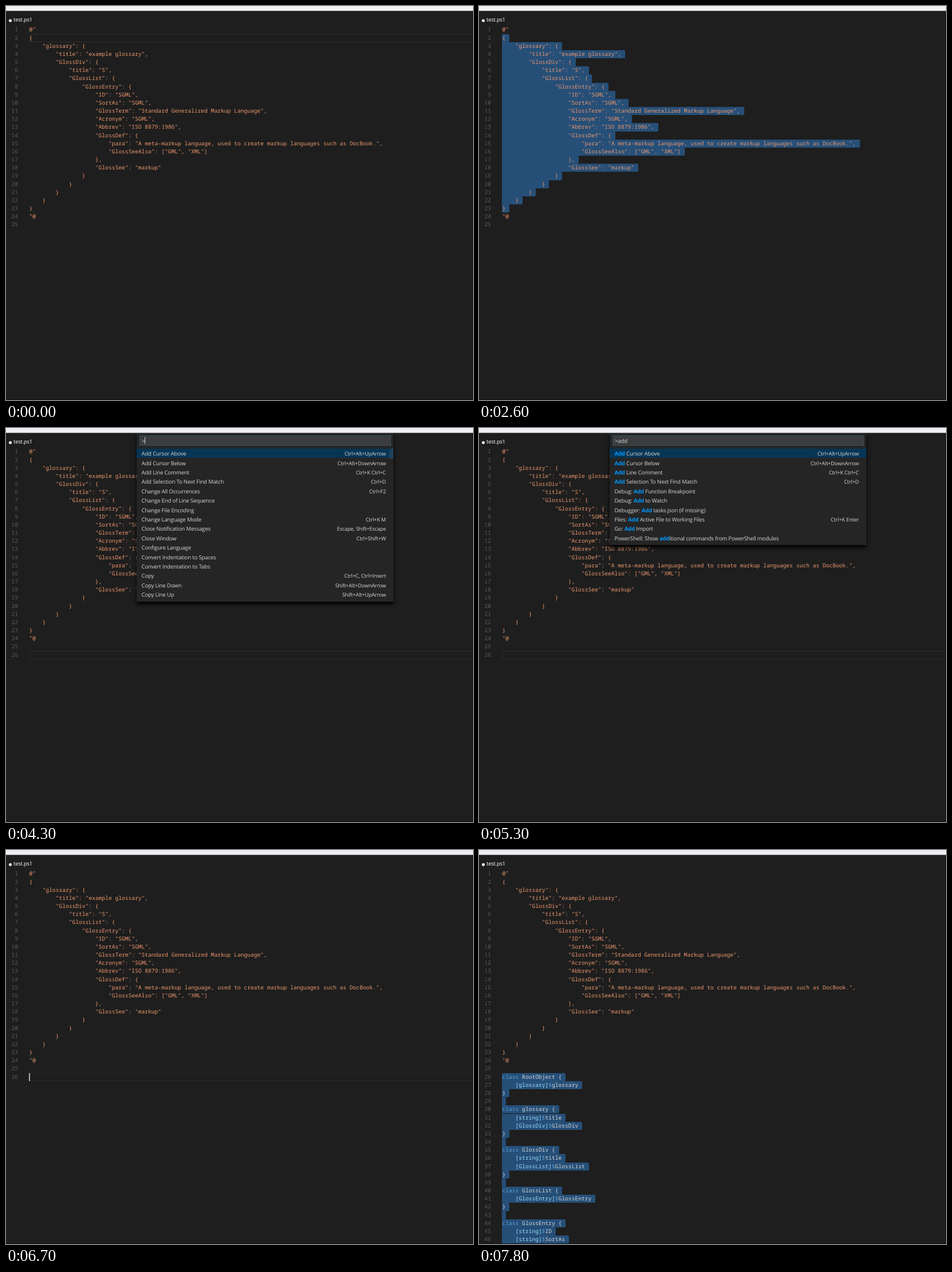
These frames come from a looping animation (815 by 687 pixels, 8 s). An HTML page:

```html
<!DOCTYPE html>
<html lang="en">
<head>
<meta charset="utf-8">
<title>Editor session</title>
<style>
  html, body { margin: 0; width: 100%; height: 100%; overflow: hidden; background: #1e1e1e; }
  #stage { position: relative; width: 815px; height: 687px; overflow: hidden; background: #1e1e1e;
    text-rendering: geometricPrecision; }
  #stage div, #stage i { position: absolute; white-space: pre; box-sizing: border-box; }
  .ui { font: 9.6px "Open Sans", "Noto Sans", sans-serif; letter-spacing: -.17px; color: #d4d4d4; }
  .code { font: 9.625px "Noto Sans Mono", "DejaVu Sans Mono", monospace; }
  #bar { left: 0; top: 0; width: 815px; height: 9px; background: #eeeef2; border-bottom: 1px solid #868689; }
  #edge { inset: 8px 0 0 0; border: solid #111; border-width: 0 1px 1px 0; }
  #dot { left: 5px; top: 23px; width: 5px; height: 5px; border-radius: 50%; background: #fff; }
  #tab { left: 13px; top: 17px; line-height: 14px; color: #fff; font-size: 9.4px; }
  .row { left: 40.5px; height: 14.17px; line-height: 14.17px; color: #ea966c; }
  .num { left: 0; width: 21px; height: 14.17px; line-height: 14.17px; text-align: right; color: #5a5a5a; }
  .sel { left: 40px; height: 14.17px; background: #264f78; border-radius: 0 2px 2px 0; }
  #here { left: 41px; width: 780px; height: 14px; border: 1px solid #2c2c2c; }
  #caret { width: 2px; height: 14px; background: #aeafad; }
  .plain { color: #d4d4d4; } .key { color: #569cd6; } .type { color: #9cdcfe; }
  #palette { left: 228px; top: 8px; width: 448px; background: #252526; box-shadow: 0 4px 6px #000; }
  #input { left: 5px; top: 5px; width: 439px; height: 18px; padding-left: 3px; line-height: 17px;
    background: #3c3c3c; border: 1px solid #31505f; }
  #input i { width: 1px; height: 12px; top: 2px; background: #d4d4d4; }
  #input .hint { color: #a0a0a0; }
  .item { left: 0; width: 448px; height: 16.4px; padding-left: 8.5px; line-height: 17.6px; }
  .item.on { background: #073655; }
  .item b { color: #0097fb; font-weight: 700; }
  .item div { right: 13px; top: 0; font-size: 9.2px; }
  #thumb { right: 0; top: 28.1px; width: 7px; height: 18px; background: rgba(121, 121, 121, .2); }
</style>
</head>
<body>
<div id="stage">
  <div id="marks"></div>
  <div id="here"></div>
  <div id="text" class="code"></div>
  <div id="caret"></div>
  <div id="dot"></div>
  <div id="tab" class="ui">test.ps1</div>
  <div id="edge"></div>
  <div id="palette" class="ui"></div>
  <div id="bar"></div>
</div>
<script>
const LOOP = 8000, TOP = 34.4, PITCH = 14.17, CHAR = 5.775;
const LIST_TOP = 28.1, ITEM = 16.4, MAX_ITEMS = 16;
const $ = id => document.getElementById(id);
const lineTop = n => TOP + (n - 1) * PITCH;

const json = `@"
{
    "glossary": {
        "title": "example glossary",
        "GlossDiv": {
            "title": "S",
            "GlossList": {
                "GlossEntry": {
                    "ID": "SGML",
                    "SortAs": "SGML",
                    "GlossTerm": "Standard Generalized Markup Language",
                    "Acronym": "SGML",
                    "Abbrev": "ISO 8879:1986",
                    "GlossDef": {
                        "para": "A meta-markup language, used to create markup languages such as DocBook.",
                        "GlossSeeAlso": ["GML", "XML"]
                    },
                    "GlossSee": "markup"
                }
            }
        }
    }
}
"@
`.split("\n");

const classes = `class RootObject {
    [glossary]$glossary
}

class glossary {
    [string]$title
    [GlossDiv]$GlossDiv
}

class GlossDiv {
    [string]$title
    [GlossList]$GlossList
}

class GlossList {
    [GlossEntry]$GlossEntry
}

class GlossEntry {
    [string]$ID
    [string]$SortAs
    [string]$GlossTerm`.split("\n");

// label | shortcut, in alphabetical order
const commands = `Add Cursor Above|Ctrl+Alt+UpArrow
Add Cursor Below|Ctrl+Alt+DownArrow
Add Line Comment|Ctrl+K Ctrl+C
Add Selection To Next Find Match|Ctrl+D
Change All Occurrences|Ctrl+F2
Change End of Line Sequence
Change File Encoding
Change Language Mode|Ctrl+K M
Close Notification Messages|Escape, Shift+Escape
Close Window|Ctrl+Shift+W
Configure Language
Convert Indentation to Spaces
Convert Indentation to Tabs
Copy|Ctrl+C, Ctrl+Insert
Copy Line Down|Shift+Alt+DownArrow
Copy Line Up|Shift+Alt+UpArrow
Debug: Add Function Breakpoint
Debug: Add to Watch
Debugger: Add tasks.json (if missing)
Files: Add Active File to Working Files|Ctrl+K Enter
Go: Add Import
PowerShell: Show additional commands from PowerShell modules
Reload Keybindings
Reload Project
Reload Window`.split("\n").map(s => s.split("|"));

const before = { rows: json, here: 2 };
const after = { rows: [...json, ""], here: 26 };
const ask = (query, more) => ({ ...after, query, caretOn: true, ...more });
const pick = { ...after, hint: "Select a command", items: [["Apply my edit!"]] };

const scenes = [
  [0, before],
  [500, { ...before, caret: [1, 2] }],
  [900, before],
  [1100, { ...before, caret: [1, 0] }],
  [1400, { ...before, caret: [2, 0] }],
  [1600, { rows: json, sel: [2, 24], caret: [25, 0] }],
  [2100, { rows: json, sel: [2, 23], caret: [24, 0] }],
  [2600, { rows: json, sel: [2, 23] }],
  [2800, { rows: json, here: 25, caret: [25, 0] }],
  [3100, { ...after, caret: [26, 0] }],
  [3600, after],
  [4000, { ...after, caret: [26, 0] }],
  [4300, ask("")],
  [4400, ask("a")],
  [4700, ask("ad")],
  [4900, ask("add")],
  [5300, ask("add", { caretOn: false })],
  [5800, ask("addi")],
  [6200, ask("addi", { focus: 2 })],
  [6700, { ...after, caret: [26, 0] }],
  [6800, { ...pick, caretOn: true }],
  [7300, pick],
  [7700, { ...after, caret: [26, 0] }],
  [7800, { rows: [...json, ...classes], sel: [26, 47] }]
];

// Spreads the query over word starts; returns [index, length] pairs or null.
function byWords(label, query, from = 0) {
  for (const { index } of label.matchAll(/\b\w/g)) {
    if (index < from) continue;
    for (let k = query.length; k; k--) {
      if (!label.startsWith(query.slice(0, k), index)) continue;
      const rest = k === query.length ? [] : byWords(label, query.slice(k), index + k);
      if (rest) return [[index, k], ...rest];
    }
  }
  return null;
}

function findMatch(label, query) {
  if (!query) return [];
  const low = label.toLowerCase(), at = low.indexOf(query);
  return byWords(low, query) || (at < 0 ? null : [[at, query.length]]);
}

function emphasise(label, spans) {
  let html = "", pos = 0;
  for (const [at, len] of spans) {
    html += label.slice(pos, at) + "<b>" + label.slice(at, at + len) + "</b>";
    pos = at + len;
  }
  return html + label.slice(pos);
}

const span = (cls, s) => `<span class="${cls}">${s}</span>`;

function paint(row, i) {
  if (i < json.length) return row;
  const field = row.match(/^( *)(\[\w+\])\$(\w+)$/);
  if (field) return field[1] + span("type", field[2]) + span("key", "$") + span("plain", field[3]);
  return span("plain", row.replace(/^class/, span("key", "class")));
}

function drawEditor({ rows, sel, here, caret }) {
  $("text").innerHTML = rows.map((row, i) => {
    const top = `style="top:${lineTop(i + 1)}px"`;
    return `<div class="num" ${top}>${i + 1}</div><div class="row" ${top}>${paint(row, i)}</div>`;
  }).join("");

  let marks = "";
  if (sel) for (let n = sel[0]; n <= sel[1]; n++)
    marks += `<div class="sel" style="top:${lineTop(n)}px;width:${rows[n - 1].length * CHAR + 7.3}px"></div>`;
  $("marks").innerHTML = marks;

  $("here").hidden = !here;
  if (here) $("here").style.top = lineTop(here) + "px";
  $("caret").hidden = !caret;
  if (caret) {
    $("caret").style.top = lineTop(caret[0]) + "px";
    $("caret").style.left = 40 + caret[1] * CHAR + "px";
  }
}

function drawPalette({ query, hint, items, caretOn, focus = 0 }) {
  const box = $("palette");
  box.hidden = query === undefined && !hint;
  if (box.hidden) return;
  const found = (items || commands)
    .map(([label, keys = ""]) => ({ label, keys, spans: findMatch(label, query) }))
    .filter(c => c.spans);
  const shown = found.slice(0, MAX_ITEMS);
  const caret = caretOn ? "<i></i>" : "";
  box.style.height = LIST_TOP + 4 + shown.length * ITEM + "px";
  box.innerHTML =
    `<div id="input">${hint ? caret + span("hint", hint) : "&gt;" + query + caret}</div>` +
    shown.map((c, i) =>
      `<div class="item${i === focus ? " on" : ""}" style="top:${LIST_TOP + i * ITEM}px">` +
      `${emphasise(c.label, c.spans)}<div>${c.keys}</div></div>`).join("") +
    (found.length > MAX_ITEMS ? '<div id="thumb"></div>' : "");
}

const start = performance.now();
let current = null;

function tick() {
  const t = Math.max(0, performance.now() - start) % LOOP;
  const scene = scenes.filter(s => s[0] <= t).pop()[1];
  if (scene !== current) {
    current = scene;
    drawEditor(scene);
    drawPalette(scene);
  }
  requestAnimationFrame(tick);
}
tick();
</script>
</body>
</html>
```
